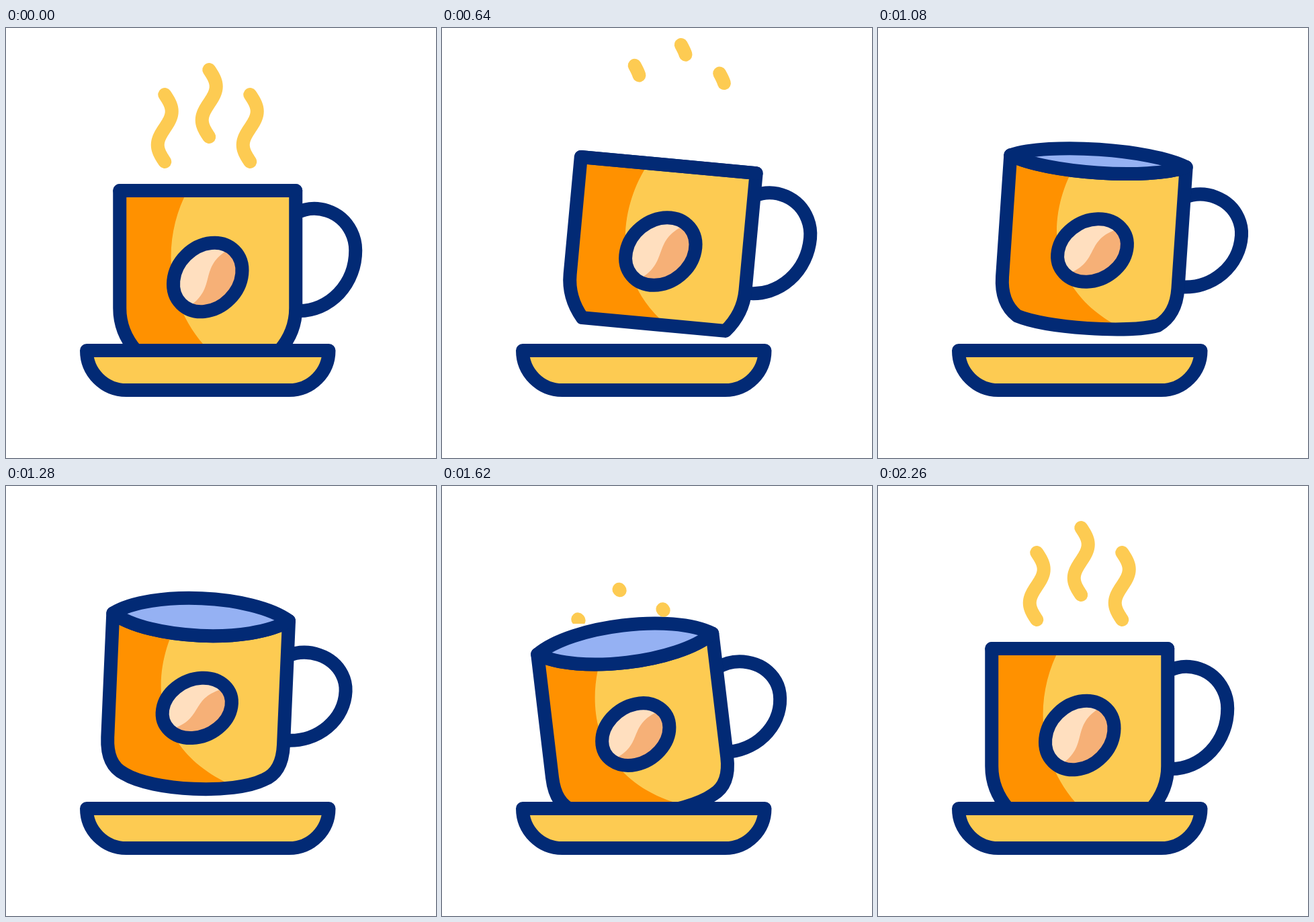
Recreate the animation shown at these times as an HTML page with a canvas. Size 640 by 640 pixels, loop 2400 ms.

```html
<!DOCTYPE html>
<html lang="en">
<head>
<meta charset="utf-8">
<title>Coffee cup</title>
<style>
  html, body { margin: 0; width: 100%; height: 100%; overflow: hidden; background: #fff; }
  canvas { display: block; }
</style>
</head>
<body>
<canvas id="stage" width="640" height="640"></canvas>
<script>
const ctx = document.getElementById('stage').getContext('2d');
const LOOP = 2400, REST_X = 300.25, REST_Y = 242, HALF = 131;
const NAVY = '#022a75', YELLOW = '#fdcb52', ORANGE = '#ff9100',
      CREAM = '#ffdfbf', TAN = '#f6b077', BLUE = '#95b1f3';
const { PI } = Math;

// The jump of the cup: time, offset from rest, tilt in degrees.
const POSES = [
  [220, 0, 0, 0],
  [420, 16, -24.5, 5.3],
  [620, 37, -38, 5.3],
  [860, 36, -35.5, 4.9],
  [950, 44, -40, 4.5],
  [1280, -10, -47, 2.5],
  [1620, -28, -7, -6.8],
  [1980, -1, 0, -0.3],
  [2200, 0, 0, 0]
];

const ramp = (t, from, to) => Math.min(1, Math.max(0, (t - from) / (to - from)));
const ease = (t, from, to) => {
  const u = ramp(t, from, to);
  return u * u * (3 - 2 * u);
};

// Smooth curve through one column of the poses, without overshoot.
function slope(i, col) {
  if (i === 0 || i === POSES.length - 1) return 0;
  const [p, q, r] = POSES.slice(i - 1, i + 2);
  const a = (q[col] - p[col]) / (q[0] - p[0]), b = (r[col] - q[col]) / (r[0] - q[0]);
  return a * b <= 0 ? 0 : 2 * a * b / (a + b);
}

function pose(t, col) {
  const next = POSES.findIndex(p => p[0] > t);
  if (next < 1) return 0;
  const a = POSES[next - 1], b = POSES[next];
  const w = b[0] - a[0], u = (t - a[0]) / w, r = 1 - u;
  return a[col] + (b[col] - a[col]) * u * u * (3 - 2 * u)
    + w * u * r * (slope(next - 1, col) * r - slope(next, col) * u);
}

function fill(color) {
  ctx.fillStyle = color;
  ctx.fill();
}

function stroke(color = NAVY) {
  ctx.strokeStyle = color;
  ctx.stroke();
}

function drawHandle(open) {
  const y = 89 + 12 * open;
  ctx.beginPath();
  ctx.ellipse(159, y, 61, 62 - 7 * open, 0, -0.65 * PI, 0);
  ctx.ellipse(136, y, 84, 90 - 13 * open, 0, 0, PI / 2);
  stroke();
}

function bodyPath(open) {
  const rim = 37 * open, foot = 107 - 3 * open, floor = 238, sag = floor + 24 * open;
  const wall = 175 + 10 * open, bend = 210 + 16 * open;
  ctx.beginPath();
  ctx.moveTo(-HALF, 0);
  ctx.bezierCurveTo(-75, rim, 75, rim, HALF, 0);
  ctx.lineTo(HALF, wall);
  ctx.quadraticCurveTo(HALF, bend, foot, floor);
  ctx.bezierCurveTo(60, sag, -60, sag, -foot, floor);
  ctx.quadraticCurveTo(-HALF, bend, -HALF, wall);
  ctx.closePath();
}

function drawBody(open, shade) {
  ctx.save();
  bodyPath(open);
  fill(YELLOW);
  ctx.clip();
  ctx.beginPath();
  ctx.moveTo(-30, 0);
  ctx.bezierCurveTo(-67, 68, -67 - 13 * shade, 168 + 22 * shade, 2 + 50 * shade, 238 + 8 * shade);
  ctx.lineTo(50, 280);
  ctx.lineTo(-150, 280);
  ctx.lineTo(-150, 0);
  fill(ORANGE);
  ctx.restore();
  bodyPath(open);
  stroke();
}

function drawRim(open) {
  const h = 37 * open;
  ctx.beginPath();
  ctx.moveTo(-HALF, 0);
  ctx.bezierCurveTo(-75, -h, 75, -h, HALF, 0);
  ctx.bezierCurveTo(75, h, -75, h, -HALF, 0);
  ctx.closePath();
  fill(BLUE);
  stroke();
}

function drawBean(open) {
  ctx.save();
  ctx.translate(0, 129 + 6.5 * open);
  // The outline is kept in a path so that the squash does not thin its line.
  const bean = new Path2D(), oval = new Path2D();
  oval.ellipse(0, 0, 56, 46, -PI / 4, 0, 2 * PI);
  bean.addPath(oval, new DOMMatrix().scale(1, 1 - 0.12 * open));
  ctx.save();
  ctx.clip(bean);
  ctx.fillStyle = CREAM;
  ctx.fillRect(-70, -70, 140, 140);
  ctx.scale(1, 1 - 0.12 * open);
  ctx.rotate(0.2 * open);
  ctx.beginPath();
  ctx.moveTo(32, -42);
  ctx.bezierCurveTo(-15, -15, 15, 15, -28, 44);
  ctx.lineTo(70, 70);
  ctx.lineTo(70, -70);
  fill(TAN);
  ctx.restore();
  ctx.strokeStyle = NAVY;
  ctx.stroke(bean);
  ctx.restore();
}

function drawSaucer() {
  ctx.beginPath();
  ctx.arc(421.5, 480, 59, 0, PI / 2);
  ctx.arc(179, 480, 59, PI / 2, PI);
  ctx.closePath();
  fill(YELLOW);
  stroke();
}

// Three wavy lines, each shown between two fractions of its height.
function drawSteam(from, to) {
  if (to <= from) return;
  for (const [x, y] of [[2, -80], [-64, -43], [63, -43]]) {
    ctx.beginPath();
    for (let i = 0; i <= 40; i++) {
      const u = from + (to - from) * i / 40;
      ctx.lineTo(x - 10.5 * Math.sin(2 * PI * u), y - 100 * u);
    }
    stroke(YELLOW);
  }
}

function draw(t) {
  const open = ease(t, 870, 1230) - ease(t, 1640, 1910);
  const shade = ease(t, 430, 860) - ease(t, 1640, 1940);
  const y = REST_Y + pose(t, 2);
  const place = () => {
    ctx.translate(REST_X + pose(t, 1), y);
    ctx.rotate(pose(t, 3) * PI / 180);
  };
  ctx.fillStyle = '#fff';
  ctx.fillRect(0, 0, 640, 640);
  ctx.lineWidth = 20;
  ctx.lineCap = ctx.lineJoin = 'round';

  ctx.save();
  place();
  drawHandle(open);
  drawBody(open, shade);
  drawRim(open);
  drawBean(open);
  ctx.restore();

  drawSaucer();

  // Steam only shows above the rim.
  ctx.save();
  ctx.beginPath();
  ctx.rect(0, 0, 640, y - 30);
  ctx.clip();
  place();
  if (t < LOOP / 2) drawSteam(ease(t, 220, 770), 1);
  else drawSteam(0, ramp(t, 1610, 2250));
  ctx.restore();
}

const start = performance.now();
function tick() {
  draw((performance.now() - start) % LOOP);
  requestAnimationFrame(tick);
}
tick();
</script>
</body>
</html>
```
